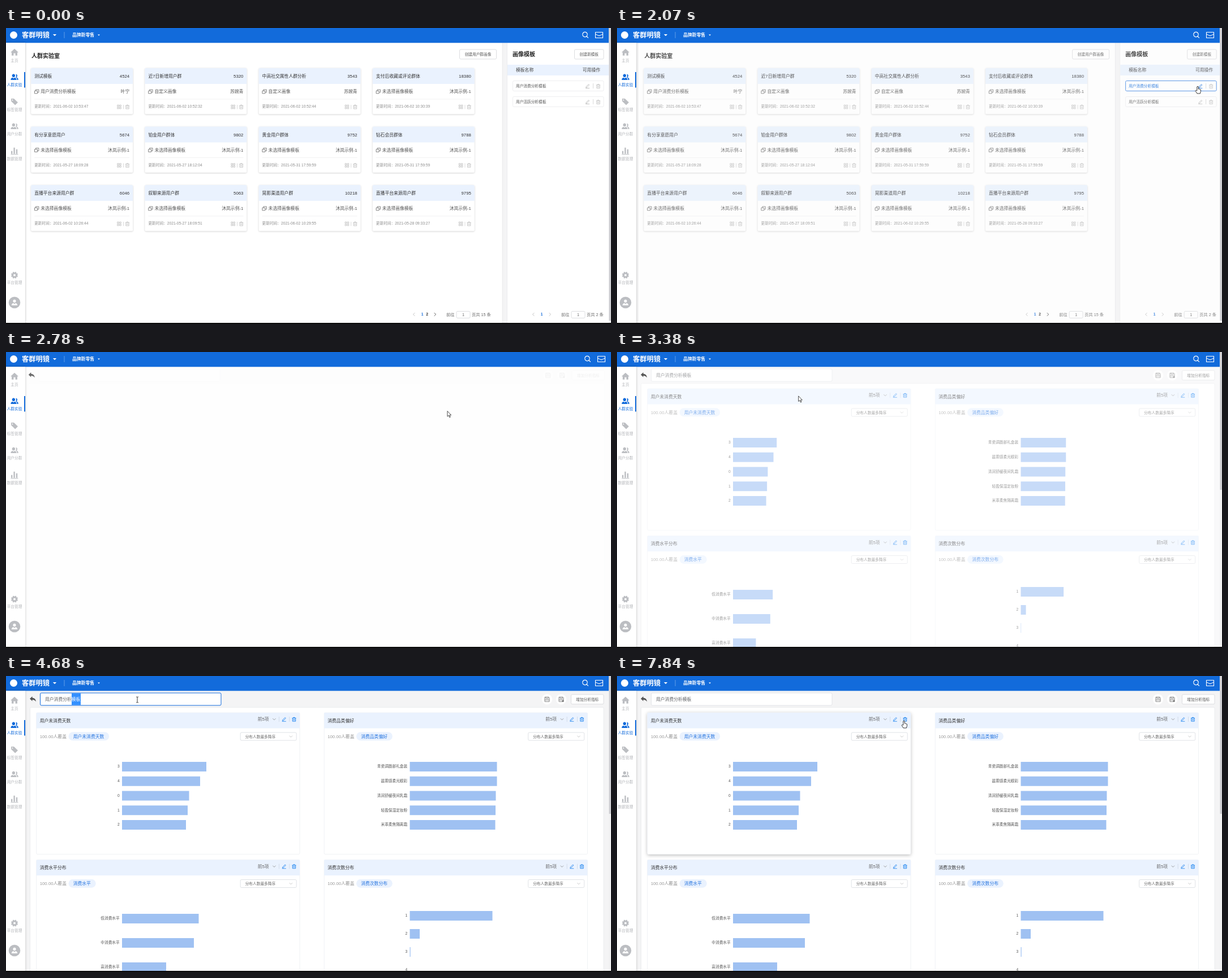
Animation, 1069 px wide and 524 px high, one loop 8000 ms. Source, as an HTML page with a canvas:

```html
<!DOCTYPE html>
<html lang="en">
<head>
<meta charset="utf-8">
<title>Audience lab</title>
<style>
  html, body { margin: 0; width: 100%; height: 100%; overflow: hidden; background: #fff; }
  canvas { display: block; width: 1069px; height: 524px; }
</style>
</head>
<body>
<canvas id="stage"></canvas>
<script>
const W = 1069, H = 524, LOOP = 8000;
const BLUE = '#126bdb', BAND = '#eaf2fe', PAGE = '#f4f4f5', LINE = '#e6e6e8';
const S = 6.68, M = 7.8, L = 10.02;
const FONT = '"Liberation Sans", "Noto Sans CJK SC", "Noto Sans CJK", sans-serif';

const stage = document.getElementById('stage');
const g = stage.getContext('2d');
const dpr = window.devicePixelRatio || 1;
stage.width = W * dpr;
stage.height = H * dpr;

// ---- helpers ----
function rect(x, y, w, h, fill) {
  g.fillStyle = fill;
  g.fillRect(x, y, w, h);
}
function box(x, y, w, h, r, fill, stroke) {
  g.beginPath();
  g.roundRect(x, y, w, h, r);
  if (fill) { g.fillStyle = fill; g.fill(); }
  if (stroke) { g.strokeStyle = stroke; g.lineWidth = 1; g.stroke(); }
}
function disc(x, y, r, fill) {
  g.beginPath();
  g.arc(x, y, r, 0, 7);
  g.fillStyle = fill;
  g.fill();
}
function text(str, x, y, size, color, align = 'left', weight = 400) {
  g.font = `${weight} ${size}px ${FONT}`;
  g.textAlign = align;
  g.fillStyle = color;
  g.fillText(str, x, y + size * 0.37);
}
function path(d, x, y, { fill, stroke, width = 0.9 }) {
  const p = new Path2D(d);
  g.save();
  g.translate(x, y);
  g.lineJoin = 'round';
  if (fill) { g.fillStyle = fill; g.fill(p, 'evenodd'); }
  if (stroke) { g.strokeStyle = stroke; g.lineWidth = width; g.stroke(p); }
  g.restore();
}
function shadowed(blur, dy, color, draw) {
  g.save();
  g.shadowColor = color;
  g.shadowBlur = blur * dpr;
  g.shadowOffsetY = dy * dpr;
  draw();
  g.restore();
}
const clamp = v => Math.max(0, Math.min(1, v));
const cubicOut = v => 1 - (1 - clamp(v)) ** 3;

// CSS "ease": cubic-bezier(.25, .1, .25, 1)
function ease(v) {
  v = clamp(v);
  let lo = 0, hi = 1, s = v;
  for (let i = 0; i < 18; i++) {
    s = (lo + hi) / 2;
    const x = 0.75 * s * (1 - s) ** 2 + 0.75 * s * s * (1 - s) + s ** 3;
    if (x < v) lo = s; else hi = s;
  }
  return 0.3 * s * (1 - s) ** 2 + 3 * s * s * (1 - s) + s ** 3;
}

// ---- icons ----
const ICON = {
  home: 'M0-6.5L7 0H5V5.5H1.5V1.5H-1.5V5.5H-5V0H-7Z',
  users: 'M-1.6-5.3a2.8 2.8 0 1 1-.01 0ZM-6.5 5V3.4Q-6 1.4-3.4 .9L-1.6 2.4L.2 .9Q3 1.4 3.4 3.4V5Z'
    + 'M2.2-5.2Q5-5 5-2.4Q4.9-.6 3.7 .5Q6.2 1.2 6.6 3.2V5H4.4V3.2Q4.2 1.4 2.2 .6Q3-.8 3-2.4Q3-4 2.2-5.2Z',
  tag: 'M-6-5.5H-1L6 1.2L1.2 6L-6-1ZM-3.6-4a1 1 0 1 0 .01 0Z',
  chart: 'M-6 0h2.4v5h-2.4ZM-1.6-6h2.4v11h-2.4ZM2.8-3h2.4v8h-2.4ZM-6.5 5.6h13v.9h-13Z',
  person: 'M0-5.2a2.7 2.7 0 1 1-.01 0ZM-5.2 5Q-5 1.6-2 1.1L0 2.6L2 1.1Q5 1.6 5.2 5Z',
  pencil: 'M-2.4 1.2L1.9-3.1L3.2-1.8L-1.1 2.4L-2.8 2.8ZM-3.4 3.8H3.6',
  trash: 'M-3.5-2.2H3.5M-1.2-2.4V-3.4H1.2V-2.4M-2.7-2.2V3.5H2.7V-2.2M-.9-.6V2M.9-.6V2',
  grid: 'M-3.3-3.3h2.6v2.6h-2.6ZM.7-3.3h2.6v2.6h-2.6ZM-3.3.7h2.6v2.6h-2.6ZM.7.7h2.6v2.6h-2.6Z',
  copy: 'M-3.7-1.2h5v4.6h-5ZM-1.8-1.4V-3.4H3.7V1.4H1.5',
  save: 'M-4-4H3L4-3V4H-4ZM-2-4V-1.4H2V-4M-4 1H4',
  back: 'M-5.5-.8L-1-5V-2.6Q5-2 5.5 4.6Q3.5 1 -1 1V3.6Z',
  down: 'M-2.6-1.3L0 1.3L2.6-1.3',
  prev: 'M1.3-2.8L-1.5 0L1.3 2.8',
  next: 'M-1.3-2.8L1.5 0L-1.3 2.8',
  caret: 'M-3.2-1.6H3.2L0 1.7Z'
};
function gear(x, y, color) {
  g.strokeStyle = color;
  g.lineWidth = 2.6;
  for (let i = 0; i < 4; i++) {
    const a = Math.PI * (i + 0.5) / 4, c = Math.cos(a) * 6, s = Math.sin(a) * 6;
    g.beginPath();
    g.moveTo(x - c, y - s);
    g.lineTo(x + c, y + s);
    g.stroke();
  }
  disc(x, y, 4.7, color);
  disc(x, y, 1.9, '#fff');
}

// ---- frame of the app ----
function header(shift) {
  rect(0, 0, 1065 + shift, 26.3, BLUE);
  disc(13.5, 12.5, 6.5, '#fff');
  text('客群明镜', 28, 12.5, 12.25, '#fff', 'left', 700);
  path(ICON.caret, 86, 12.5, { fill: '#fff' });
  rect(102.6, 7, 0.8, 11, '#77abee');
  text('品牌新零售', 117, 12.5, M, '#fff', 'left', 700);
  path('M-2-1H2L0 1.2Z', 164, 12.5, { fill: '#fff' });
  const x = 1023.5 + shift;
  path('M-.5-4.8a4.3 4.3 0 1 1-.01 0M2.6 3L5.4 5.6', x, 12, { stroke: '#fff', width: 1.2 });
  path('M-6.5-4.9H6.5V5.1H-6.5ZM-6.5-1.8Q-2 1.2 0 1.2T6.5-1.8', x + 24.5, 12.4, { stroke: '#fff', width: 1.1 });
}

function sidebar() {
  shadowed(4, 0, 'rgba(0,0,0,.22)', () => rect(0, 26.3, 34, 500, '#fff'));
  const items = [['home', '主页'], ['users', '人群实验'], ['tag', '标签管理'], ['users', '用户分群'], ['chart', '数据管理']];
  items.forEach(([icon, label], i) => {
    const y = 43.3 + i * 43.6, on = i === 1;
    path(ICON[icon], 15, y, { fill: on ? BLUE : '#bcbec2' });
    text(label, 15, y + 13.8, S, on ? BLUE : '#b4b6ba', 'center', on ? 500 : 400);
  });
  rect(32, 78, 2, 27.5, BLUE);
  gear(15, 437.5, '#bcbec2');
  text('平台管理', 15, 451, S, '#b4b6ba', 'center');
  disc(15, 486, 10.3, '#bcbec2');
  path(ICON.person, 15, 486, { fill: '#fff' });
}

function scrollbar(length) {
  rect(1065, 0, 4, 522, '#f1f1f2');
  rect(1065.5, 0, 3.5, length, '#cdcdd1');
}

// ---- list page ----
const NONE = '未选择画像模板', OWNER = '沐岚示例-1';
const GROUPS = [
  ['测试模板', 4524, '用户消费分析模板', '叶宁', '06-02 10:53:47'],
  ['近7日新增用户群', 5320, '自定义画像', '苏婉青', '06-02 10:52:32'],
  ['中高社交属性人群分析', 3543, '自定义画像', '苏婉青', '06-02 10:52:44'],
  ['支付后收藏或评论群体', 18380, NONE, OWNER, '06-02 10:30:39'],
  ['有分享意愿用户', 5674, NONE, OWNER, '05-27 18:09:28'],
  ['铂金用户群体', 9802, NONE, OWNER, '05-27 18:12:04'],
  ['黄金用户群体', 9752, NONE, OWNER, '05-31 17:59:59'],
  ['钻石会员群体', 9788, NONE, OWNER, '05-31 17:59:59'],
  ['直播平台来源用户群', 6046, NONE, OWNER, '06-02 10:26:44'],
  ['叙聊来源用户群', 5063, NONE, OWNER, '05-27 18:09:51'],
  ['晃影渠道用户群', 10218, NONE, OWNER, '06-02 10:29:55'],
  ['直播平台来源用户群', 9795, NONE, OWNER, '05-28 09:33:27']
];

function groupCard([name, count, template, owner, date], i) {
  const x = 44.2 + (i % 4) * 201.2, y = 71 + Math.floor(i / 4) * 103.5;
  shadowed(3, 0.8, 'rgba(0,0,0,.2)', () => box(x, y, 180, 81.5, 2, '#fff'));
  box(x, y, 180, 28, [2, 2, 0, 0], BAND);
  text(name, x + 6, y + 14.3, M, '#333');
  text(count, x + 174, y + 14.3, M, '#333', 'right');
  path(ICON.copy, x + 10, y + 41.5, { stroke: '#777' });
  text(template, x + 17, y + 41.5, M, '#555');
  text(owner, x + 174, y + 41.5, M, '#555', 'right');
  rect(x + 6, y + 54.6, 168, 0.7, '#ececee');
  text('更新时间：2021-' + date, x + 6, y + 67.8, S, '#8c8c8c');
  path(ICON.grid, x + 155.8, y + 68.6, { stroke: '#bbb', width: 0.8 });
  rect(x + 162.8, y + 65, 0.7, 7.5, '#ccc');
  path(ICON.trash, x + 170.3, y + 68.6, { stroke: '#bbb', width: 0.8 });
}

function button(x, y, w, label) {
  box(x + 0.5, y, w, 17, 2, '#fff', '#dcdde0');
  text(label, x + w / 2 + 0.5, y + 8.5, S, '#555', 'center');
}

function pager(x, pages, total, gap) {
  const y = 507;
  path(ICON.prev, x, y, { stroke: '#bbb' });
  text('1', x + 14.5, y, S, BLUE, 'center', 700);
  if (pages > 1) text('2', x + 23, y, S, '#333', 'center', 700);
  path(ICON.next, x + gap, y, { stroke: pages > 1 ? '#444' : '#bbb' });
  const f = x + gap + 20;
  text('前往', f, y + 0.5, 7.24, '#666');
  box(f + 18, 501.5, 24, 12, 2, '#fff', '#dcdde0');
  text('1', f + 30, y + 0.5, 7.24, '#666', 'center');
  text(`页共 ${total} 条`, f + 45, y + 0.5, 7.24, '#666');
}

function templateRow(label, y, hover, armed) {
  box(895.5, y + 0.5, 160.5, 18, 2, '#fff', hover ? '#3d84e2' : '#eeeef0');
  text(label, 901, y + 9.7, S, hover ? BLUE : '#555');
  path(ICON.pencil, 1027.5, y + 9.7, { stroke: armed ? BLUE : '#bbb' });
  rect(1037.2, y + 5, 0.7, 9, '#ccc');
  path(ICON.trash, 1046.5, y + 10, { stroke: '#bbb', width: 0.8 });
}

function listPage(t, cur) {
  rect(35, 26.3, 842, 496, '#fff');
  rect(877, 26.3, 9, 496, PAGE);
  rect(876.7, 26.3, 0.8, 496, LINE);
  rect(885.5, 26.3, 0.8, 496, LINE);
  rect(886, 26.3, 179, 496, '#fff');
  text('人群实验室', 45, 49.5, L, '#222', 'left', 700);
  button(801, 38, 65, '创建用户群画像');
  GROUPS.forEach(groupCard);
  pager(721, 2, 15, 37);
  text('画像模板', 895, 46.5, L, '#222', 'left', 700);
  button(1004, 38, 51.5, '创建新模板');
  rect(886, 65, 179, 19, BAND);
  text('模板名称', 901, 74.5, M, '#444');
  text('可用操作', 1050, 74.5, M, '#444', 'right');
  templateRow('用户消费分析模板', 93, cur.row === 1, t > 1620);
  templateRow('用户活跃分析模板', 121, cur.row === 2, false);
  pager(932, 1, 2, 29);
}

// ---- detail page ----
const CHARTS = [
  { title: '用户未消费天数', labels: '3,4,0,1,2', bars: [149, 138, 118.5, 116, 113], top: 87, step: 25.75 },
  { title: '消费品类偏好', labels: '青瓷调唇部礼盒装,晨雾感柔光眼彩,清润舒缓夜间乳霜,轻盈保湿定妆粉,米萃柔焦隔离霜',
    bars: [154, 154, 152, 151.5, 151], top: 87, step: 25.75 },
  { title: '消费水平分布', tag: '消费水平', labels: '低消费水平,中消费水平,高消费水平', bars: [135.5, 127, 78], top: 95.5, step: 43 },
  { title: '消费次数分布', labels: '1,2,3,4', bars: [146, 17.5, 1.2, 0], top: 90.5, step: 32 }
];

function chartCard({ title, tag = title, labels, bars, top, step }, i, grow, hover) {
  const x = 53.7 + (i % 2) * 508.5, y = 65 + (i >> 1) * 260.5;
  if (hover) shadowed(6, 1.2, 'rgba(0,0,0,.28)', () => box(x, y, 465.3, 251, 2, '#fff'));
  box(x, y, 465.3, 250.5, 2, '#fff', '#f0f2f5');
  rect(x, y, 465.3, 27.6, BAND);
  text(title, x + 6, y + 14, M, '#333', 'left', 500);
  text('前5项', x + 391, y + 11.5, M, '#666');
  path(ICON.down, x + 420.2, y + 11.5, { stroke: '#888', width: 0.8 });
  rect(x + 428.6, y + 7, 0.7, 9, '#c9d3e0');
  path(ICON.pencil, x + 437.5, y + 11.5, { stroke: '#2d8cf0' });
  rect(x + 446.8, y + 7, 0.7, 9, '#c9d3e0');
  path(ICON.trash, x + 455.3, y + 11.7, { stroke: '#2d8cf0', width: 1 });
  text('100.00人覆盖', x + 6, y + 42, M, '#999');
  box(x + 56.8, y + 34.3, tag.length * M + 17, 15, 7.5, BAND);
  text(tag, x + 65, y + 42, M, '#2272df');
  box(x + 360.5, y + 35, 99, 14, 2, '#fff', '#dfe2e6');
  text('分布人数最多降序', x + 369, y + 42.2, S, '#666');
  path(ICON.down, x + 449.7, y + 42, { stroke: '#bbb', width: 0.8 });
  labels.split(',').forEach((label, k) => {
    const by = y + top + k * step;
    rect(x + 151.3, by, bars[k] * grow, 17, '#9fc1f2');
    text(label, x + 147, by + 8, S, '#555', 'right');
  });
}

function detailPage(t, cur) {
  const loaded = t >= 3240, right = loaded ? 0 : 4;
  const focus = t >= 4110 && t < 5970;
  rect(35, 26.3, 1035, 496, PAGE);
  box(60.5, 30, 319.5, 22, 2, '#fff', focus ? BLUE : '#e2e4e8');
  if (loaded) {
    text('用户消费分析模板', 69, 41, M, '#606266');
    if (t >= 4580 && t < 5120) {
      rect(116, 30.5, 16, 21, '#3390ff');
      text('模板', 69 + 6 * M, 41, M, '#fff');
    }
  }
  for (const x of [956, 981]) {
    disc(x + right, 41.3, 9.2, '#fff');
    path(ICON.save, x + right, 41.3, { stroke: '#777' });
  }
  path('M1.5 3H4.5M3 1.5V4.5', 981 + right, 41.3, { stroke: '#555' });
  button(998 + right, 32.8, 57.5, '增加分析指标');
  box(42.5, 55.5, 1013.5 + right, 480, 2, '#fff', '#ebecee');
  if (loaded) {
    const grow = cubicOut((t - 3165) / 1000);
    CHARTS.forEach((c, i) => chartCard(c, i, grow, i === 0 && cur.onCard));
  }
  const veil = 0.9 * (1 - ease((t - 3287) / 300));
  rect(35, 26.3, 1035, 496, `rgba(255,255,255,${veil})`);
  path(ICON.back, 47.5, 41, { fill: '#555' });
}

// ---- pointer ----
const TRACK = [
  [270, 985, 524], [600, 1004, 300], [1050, 1021, 128], [1080, 1021, 128], [1470, 1023, 104],
  [1620, 1023, 104], [1850, 1026, 103], [2430, 1026, 103], [2850, 720, 104], [3220, 405, 92],
  [3380, 321, 78], [3600, 268, 58], [4050, 235, 42], [4110, 235, 42], [4260, 232, 42], [5110, 232, 42],
  [5450, 335, 35], [5840, 454, 38], [5940, 454, 38], [6150, 508, 42], [6300, 546, 46],
  [6550, 506, 72], [6960, 506, 72], [7170, 493, 77.5], [7680, 493, 77.5], [7840, 507, 79], [8000, 507, 79]
];

function slope(i, k) {
  const a = TRACK[i - 1], b = TRACK[i], c = TRACK[i + 1];
  const rest = (p, q) => !p || !q || (p[1] === q[1] && p[2] === q[2]);
  return rest(a, b) || rest(b, c) ? 0 : (c[k] - a[k]) / (c[0] - a[0]);
}

function pointer(t) {
  if (t < 270) return { kind: '' };
  const i = Math.max(0, TRACK.findIndex(p => p[0] > t) - 1);
  const a = TRACK[i], b = TRACK[i + 1], d = b[0] - a[0], u = (t - a[0]) / d;
  const at = k => a[k] * (1 + 2 * u) * (1 - u) ** 2 + b[k] * u * u * (3 - 2 * u)
    + d * (slope(i, k) * u * (1 - u) ** 2 - slope(i + 1, k) * u * u * (1 - u));
  const x = at(1), y = at(2), cur = { x, y, kind: 'arrow' };
  if (t < 2490) {
    if (x > 895 && x < 1056) cur.row = y > 93 && y < 112 ? 1 : y > 121 && y < 140 ? 2 : 0;
    if (cur.row) cur.kind = 'hand';
  } else if (t > 3500) {
    cur.onCard = t > 6000 && x > 53 && x < 519 && y > 65;
    if (x < 380 && y > 30 && y < 52) cur.kind = 'beam';
    else if (cur.onCard && y > 70 && y < 84 && (Math.abs(x - 492) < 5 || Math.abs(x - 508) < 5)) cur.kind = 'hand';
  }
  return cur;
}

function drawPointer({ x, y, kind }) {
  if (kind === 'arrow') {
    path('M0 0V9.6L2.2 7.6L3.8 11.2L5.3 10.5L3.7 7.1H6.7Z', x, y, { fill: '#fff', stroke: '#222', width: 0.8 });
  } else if (kind === 'hand') {
    path('M-1.2 8V1Q0-.6 1.2 1V5Q2.2 4.3 2.8 5.3Q3.8 4.8 4.2 5.8Q5.4 5.5 5.4 7V9.5L4.4 13H-1L-4 8.4Q-3.6 6.8-2.2 7.6Z',
      x, y, { fill: '#fff', stroke: '#222', width: 0.9 });
  } else if (kind === 'beam') {
    path('M-2-5H-.5L0-4.5L.5-5H2M0-4.5V4.5M-2 5H-.5L0 4.5L.5 5H2', x, y, { stroke: '#222', width: 0.9 });
  }
}

// ---- scene ----
function draw(t) {
  const cur = pointer(t), list = t < 2495, bare = !list && t < 3240;
  g.setTransform(dpr, 0, 0, dpr, 0, 0);
  rect(0, 0, W, H, PAGE);
  const leave = ease((t - 1995) / 500), enter = ease((t - 2495) / 500);
  g.save();
  g.beginPath();
  g.rect(34, 26, bare ? 1035 : 1031, 496);
  g.clip();
  g.translate(list ? 16.7 * leave : 16.7 * (enter - 1), 0);
  if (list) listPage(t, cur); else detailPage(t, cur);
  g.restore();
  const hidden = list ? leave : 1 - enter;
  if (hidden > 0) {
    g.globalAlpha = hidden;
    rect(34, 26.3, 1035, 496, PAGE);
    g.globalAlpha = 1;
  }
  header(bare ? 4 : 0);
  sidebar();
  if (!bare) scrollbar(list ? 518 : 244);
  rect(0, 522, W, 2, '#0a0a0a');
  drawPointer(cur);
}

const start = performance.now();
function tick() {
  draw((performance.now() - start) % LOOP);
  requestAnimationFrame(tick);
}
tick();
</script>
</body>
</html>
```
